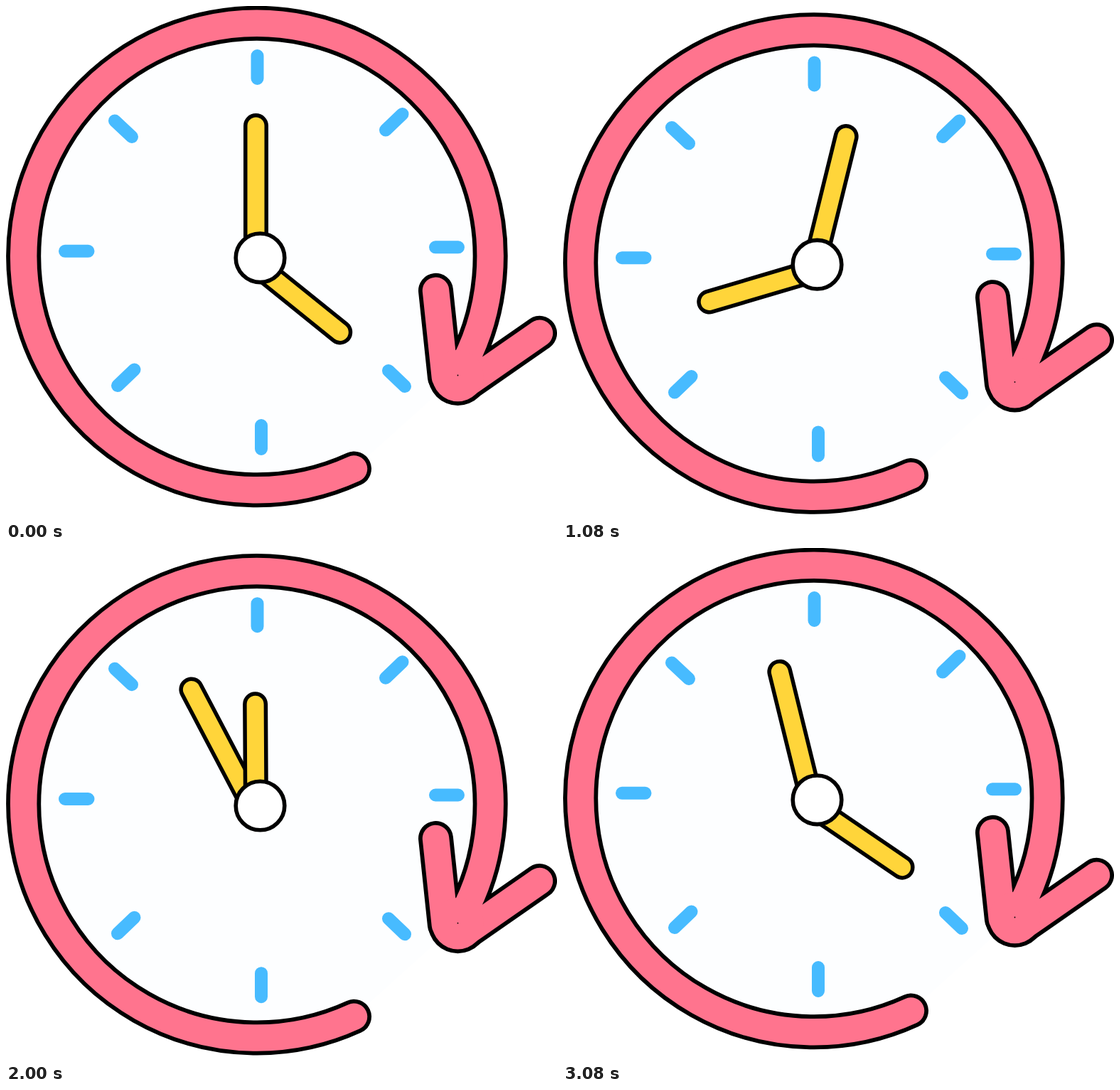
These frames come from a looping animation (775x723 px, 3.12 s). An HTML page:

```html
<!DOCTYPE html>
<html lang="en">
<head>
<meta charset="utf-8">
<title>Clock</title>
<style>
  html, body { margin: 0; width: 100%; height: 100%; overflow: hidden; background: #fff; }
  svg { display: block; width: 775px; height: 723px; }
  path { fill: none; stroke-linecap: round; }
  .edge { stroke: #000; fill: #000; }
  .pink { stroke: #ff748e; fill: #ff748e; }
  .ticks { stroke: #47bbff; stroke-width: 18; }
  .outer { stroke: #000; stroke-width: 35; }
  .inner { stroke: #ffd53a; stroke-width: 24; }
</style>
</head>
<body>
<svg viewBox="0 0 775 723">
  <defs>
    <!-- open ring and the two arrow arms -->
    <path id="ring" d="M489.5 651A328.2 328.2 0 1 1 635.5 519.5M604.5 400.3L617.4 521.9M750.5 460.3L645 533.7"/>
    <path id="minute" d="M0 0V-195"/>
    <path id="hour" d="M0 0V-152"/>
  </defs>
  <g id="clock">
    <path d="M489.5 651A328.2 328.2 0 1 1 635.5 519.5Z" style="fill:#fdfeff"/>
    <path class="ticks" d="M353.5 70V102M557.5 152L534 174.5M604 339.3H636M538 513L561 535M359 590V623M180.5 511.5L157 534M83 344.8H115.5M153 161.5L177 184"/>
    <g class="edge" stroke-width="49">
      <use href="#ring"/>
      <circle cx="635.5" cy="520" r="42" stroke="none" style="stroke:none"/>
    </g>
    <g class="pink" stroke-width="37.5">
      <use href="#ring"/>
      <circle cx="635.5" cy="520" r="36.2" style="stroke:none"/>
    </g>
    <circle cx="635.5" cy="519.5" r=".9"/>
    <g id="minuteHand"><use href="#minute" class="outer"/><use href="#minute" class="inner"/></g>
    <g id="hourHand"><use href="#hour" class="outer"/><use href="#hour" class="inner"/></g>
    <circle cx="357.5" cy="354.3" r="34.3" fill="#fff" stroke="#000" stroke-width="5.6"/>
  </g>
</svg>
<script>
  const LOOP = 3120, STEP = 40;
  // [time, vertical offset], linear in between
  const bob = [[0, 0], [740, 17.4], [1480, 0], [2240, 12], [3080, 0], [LOOP, 0]];
  const byId = id => document.getElementById(id);
  const clock = byId('clock'), minuteHand = byId('minuteHand'), hourHand = byId('hourHand');

  function offset(t) {
    const i = bob.findIndex(key => key[0] > t);
    const [t0, y0] = bob[i - 1], [t1, y1] = bob[i];
    return y0 + (y1 - y0) * (t - t0) / (t1 - t0);
  }

  function turn(hand, angle) {
    hand.setAttribute('transform', `translate(351.5 363.5) rotate(${angle})`);
  }

  function draw() {
    const t = Math.floor(performance.now() % LOOP / STEP) * STEP;
    const turnAngle = 360 * t / LOOP;
    clock.setAttribute('transform', `translate(0 ${offset(t)})`);
    turn(minuteHand, 3 * turnAngle);
    turn(hourHand, 128.9 + turnAngle);
    requestAnimationFrame(draw);
  }
  draw();
</script>
</body>
</html>
```
